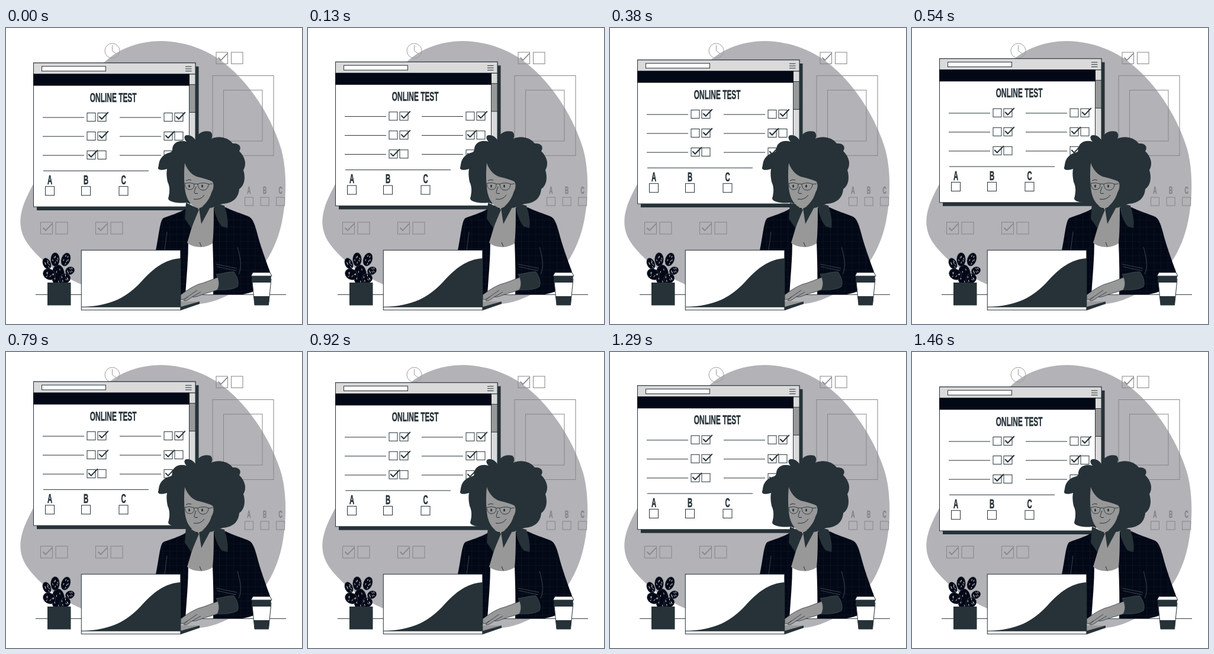
Recreate the animation shown at these times as an HTML page. Size 500 by 500 pixels, loop 1.5 s.

```html
<!DOCTYPE html>
<html lang="en">
<head>
<meta charset="utf-8">
<title>Online test</title>
<style>
  html, body { margin: 0; width: 100%; height: 100%; overflow: hidden; background: #fff; }
  svg { display: block; width: 100vw; height: 100vh; }
  text { font-family: "Liberation Sans", Arial, sans-serif; font-weight: bold; text-anchor: middle; }
  .line { fill: none; stroke: #263238; stroke-width: 1; }
  .faint { fill: none; stroke: #85858a; stroke-width: 1; }
  .skin { fill: #989898; }
  .slate { fill: #263238; }
  .ink { fill: #030817; }
  .seam { fill: none; stroke: #4a555c; stroke-width: .8; }
</style>
</head>
<body>
<svg id="stage" viewBox="0 0 500 500" xmlns="http://www.w3.org/2000/svg"></svg>
<script>
const stage = document.getElementById('stage');

const path = (d, cls, extra = '') => `<path d="${d}" class="${cls}" ${extra}/>`;
const rect = (x, y, w, h, cls, extra = '') =>
  `<rect x="${x}" y="${y}" width="${w}" height="${h}" class="${cls}" ${extra}/>`;
const tick = (x, y, cls, width = 2) =>
  path(`M${x} ${y}l4.5 4.5 11-11.5`, cls, `style="stroke-width:${width}"`);

// Condensed display lettering
const label = (x, y, str, size, color = '#263238') =>
  `<text transform="translate(${x} ${y}) scale(.53 1)" font-size="${size}"
    fill="${color}" stroke="${color}" stroke-width=".5">${str}</text>`;

function backdrop() {
  let s = path(`M160 64C184 38 220 22 262 22C306 23 346 38 379 68C418 102 451 157 465 205
    C475 242 474 290 466 328C458 366 440 400 413 425C385 449 355 465 318 467
    C255 470 188 457 127 433C91 418 55 391 35 362C21 340 21 317 34 288C44 266 54 250 62 235
    C85 190 110 115 160 64Z`, '', 'fill="#b2b2b7"');
  s += '<circle cx="179.5" cy="38.5" r="12.5" class="faint" style="stroke:#9c9ca0"/>';
  s += path('M179.5 29v9.5l7 5', 'faint', 'style="stroke:#9c9ca0"');
  s += rect(355, 41, 19.5, 19.5, 'faint') + rect(380.5, 41, 19.5, 19.5, 'faint');
  s += tick(358.5, 50, 'faint', 1.8);
  s += rect(349, 80.5, 103, 135, 'faint') + rect(367.5, 105, 65.5, 86, 'faint');
  [...'ABC'].forEach((c, i) => {
    const x = 410.5 + i * 26.6;
    s += label(x, 279.5, c, 16.5, '#838388') + rect(x - 7, 286, 14, 14, 'faint');
  });
  for (const x of [58.5, 151.5]) {
    s += rect(x, 328, 20, 20, 'faint') + rect(x + 25.5, 328, 20, 20, 'faint');
    s += tick(x + 4, 337.5, 'faint', 1.8);
  }
  return s;
}

function browser() {
  let s = rect(52, 65, 273.5, 243, 'slate');
  s += rect(46.5, 59, 273.5, 243, 'line', 'style="fill:#fff"');
  s += rect(46.5, 59, 273.5, 19, 'line', 'style="fill:#dadada"');
  s += rect(60.5, 64.8, 108, 8, 'line', 'style="fill:#fff"');
  s += path('M303 65.2h10.5M303 69h10.5M303 72.8h10.5', 'line');
  s += rect(309.5, 78, 10.5, 224, 'line', 'style="fill:#dadada"');
  s += rect(309.5, 95.5, 10.5, 47, 'line', 'style="fill:#999"');
  s += rect(46.5, 78, 263, 19, 'ink', 'stroke="#030817"');
  s += label(181.2, 124.6, 'ONLINE TEST', 22.5);
  const marks = [[1, 1], [1, 0], [0, 0]];
  marks.forEach((row, r) => row.forEach((m, c) => {
    const x = 62 + c * 130, y = 150.5 + r * 32;
    s += path(`M${x} ${y + .6}h70`, 'line');
    s += rect(x + 75, y - 7, 14, 14, 'line') + rect(x + 93, y - 7, 14, 14, 'line');
    s += tick(x + 77.3 + m * 18, y - 1.2, 'line');
  }));
  s += path('M63 241.3h178', 'line');
  [...'ABC'].forEach((c, i) => {
    const x = 74.2 + [0, 61, 124.5][i];
    s += label(x, 264, c, 21.5) + rect(x - 7.7, 267.7, 15, 15, 'line');
  });
  return s;
}

function woman() {
  let s = '<defs><pattern id="check" width="12" height="12" patternUnits="userSpaceOnUse">'
    + '<path d="M0 .5H12M.5 0V12" stroke="#0e1721" stroke-width=".6"/></pattern></defs>';
  const coat = `M306 304C292 313 275 317 266 321C260 325 259 346 253 376V450H400
    C430 444 448 432 446 412C439 393 429 366 423 342C420 332 417 321 409 318C397 313 383 309 371 303Z`;
  s += path(coat, 'ink') + path(coat, '', 'fill="url(#check)"');
  // Shirt, chest and neck
  s += path('M308 360C308 390 305 420 303 450H350C351 420 350 390 349 360Z', '', 'fill="#fff"');
  s += path('M326 300L352 282C350 308 352 335 349 364Q337 371 327 370Q315 370 306 363L314 336Z', 'skin');
  s += path('M327 362l3 7', 'line');
  s += path('M326 304C336 302 344 293 350 282V294C343 306 336 320 330 331Z', 'slate');
  // Hair
  s += path(`M305 192C299 186 301 180 307 181C313 181 317 185 320 189C323 178 333 172 345 175
    C349 178 349 183 347 187C359 181 376 185 383 195C393 194 399 200 394 208
    C404 218 407 230 401 240C405 253 403 266 394 272C393 286 384 296 366 297
    C356 300 350 304 344 304L304 295C293 297 274 294 274 288C277 277 277 268 273 260
    C271 250 271 244 272 238C264 241 256 240 257 236C259 230 257 222 268 214
    C274 210 279 211 281 207C280 195 291 188 305 192Z`, 'slate');
  // Face
  s += path(`M302 228C306 240 315 250 326 252C334 254 342 256 348 259
    C352 262 351 272 347 278C344 290 333 303 325 305C315 302 307 293 304 281C301 270 300 245 302 228Z`, 'skin');
  s += path('M304 258q4-3 9-1M321 268C319 274 317 278 319 279.5H324M317 289Q329 291 335 282', 'line');
  s += path(`M302 262.5Q310 260 317.5 263C319 270 315 273 310 273C305 273 302 268 302 262.5Z
    M324 263.5Q333 260 342 263.5C342 270 338 274 333 274C327 274 324 269 324 263.5ZM317.5 264q3.5-2 6.5 0M342 264l7-1`,
    'line', 'style="stroke-width:.9"');
  for (const x of [309.5, 331.5])
    s += `<ellipse cx="${x}" cy="267" rx="1.4" ry="2.5" class="slate"/>`;
  // Lapels
  s += path('M304 295L314 300L326 307L313 338L302 322Z', 'slate');
  s += path('M352 296L369 300C373 314 376 326 374 338L364 335C358 327 354 318 352 308Z', 'slate');
  s += path('M272 344L268 376M355 399L390 406M356 403L389 410M391 370C396 388 399 403 393 416', 'seam');
  return s;
}

function desk() {
  let s = path('M50 450.3H473', 'line');
  s += woman();
  // Laptop base
  s += path('M295 462H327L295 472Z', '', 'fill="#999"');
  s += path('M327 462V466L295 477V471Z', 'slate');
  s += path(`M363 419C350 424 337 430 325 433C313 438 304 444 295 451V458
    C299 460 302 457 307 454L300 460C304 463 310 457 315 454C320 456 330 450 339 448L365 440Z`,
    'skin', 'stroke="#263238" stroke-width=".8"');
  s += path('M307 454L323 443M315 454L329 446', 'line', 'style="stroke-width:.8"');
  s += path('M355 416C367 415 377 411 385 412C391 420 394 430 391 437C383 442 368 443 357 442C361 434 360 425 355 416Z',
    'slate', 'stroke="#4a555c" stroke-width=".7"');
  // Laptop lid
  s += rect(127.3, 375.3, 167.5, 101, 'line', 'style="fill:#fff"');
  s += path('M127 471C178 470 205 454 229 428C250 405 268 391 295 389V471Z', 'slate');
  s += path('M127 471.3H295', 'line');
  return s;
}

function cup() {
  return path('M415.5 424L420 468H443.5L448 424Z', 'line', 'style="fill:#fff"')
    + path('M418.5 453L420 468H443.5L445 453Z', 'slate')
    + path('M415 419H448L446.8 430H416.2Z', 'slate')
    + path('M417 413H446L449 419H414Z', 'line', 'style="fill:#fff"');
}

function plant() {
  // x, y, rx, ry, tilt
  const pads = [[88, 418, 11, 18, 0], [69, 398, 6.5, 10, -25], [83, 391, 7.5, 11.5, 0], [101, 391, 7.5, 11.5, 20],
    [108, 410, 8, 6.5, -25], [73, 416, 11, 9, 30], [100, 423, 9, 8, -20]];
  let s = '', seed = 7;
  const rnd = () => (seed = seed * 16807 % 2147483647) / 2147483647;
  for (const [x, y, rx, ry, tilt] of pads) {
    s += `<g transform="translate(${x} ${y}) rotate(${tilt})">`
      + `<ellipse rx="${rx}" ry="${ry}" class="ink" stroke="#59636a" stroke-width=".4"/>`;
    for (let i = 0; i < 6; i++) {
      const a = i * 2.4 + rnd(), r = .3 + .4 * rnd();
      s += path(`M${(rx * r * Math.cos(a)).toFixed(1)} ${(ry * r * Math.sin(a) - 1.5).toFixed(1)}l${(rnd() * 2 - 1).toFixed(1)} 3`,
        '', 'stroke="#fff" stroke-width=".8"');
    }
    s += '</g>';
  }
  return s + rect(70, 430, 39.5, 38.5, 'slate');
}

stage.innerHTML = backdrop() + `<g id="browser">${browser()}</g>` + desk() + cup() + plant();

const floating = document.getElementById('browser');
const LOOP = 1500, FRAMES = 36, RISE = 10;

// Linear rise and fall, stepped at 24 pictures per second
function draw(ms) {
  const step = Math.floor((ms % LOOP + 4) * FRAMES / LOOP) % FRAMES;
  const p = (step + .5) / FRAMES;
  const lift = RISE * (1 - Math.abs(1 - 2 * p)) - RISE / FRAMES;
  floating.setAttribute('transform', `translate(0 ${-lift.toFixed(3)})`);
}

const start = performance.now();
function loop() {
  draw(performance.now() - start);
  requestAnimationFrame(loop);
}
loop();
</script>
</body>
</html>
```
